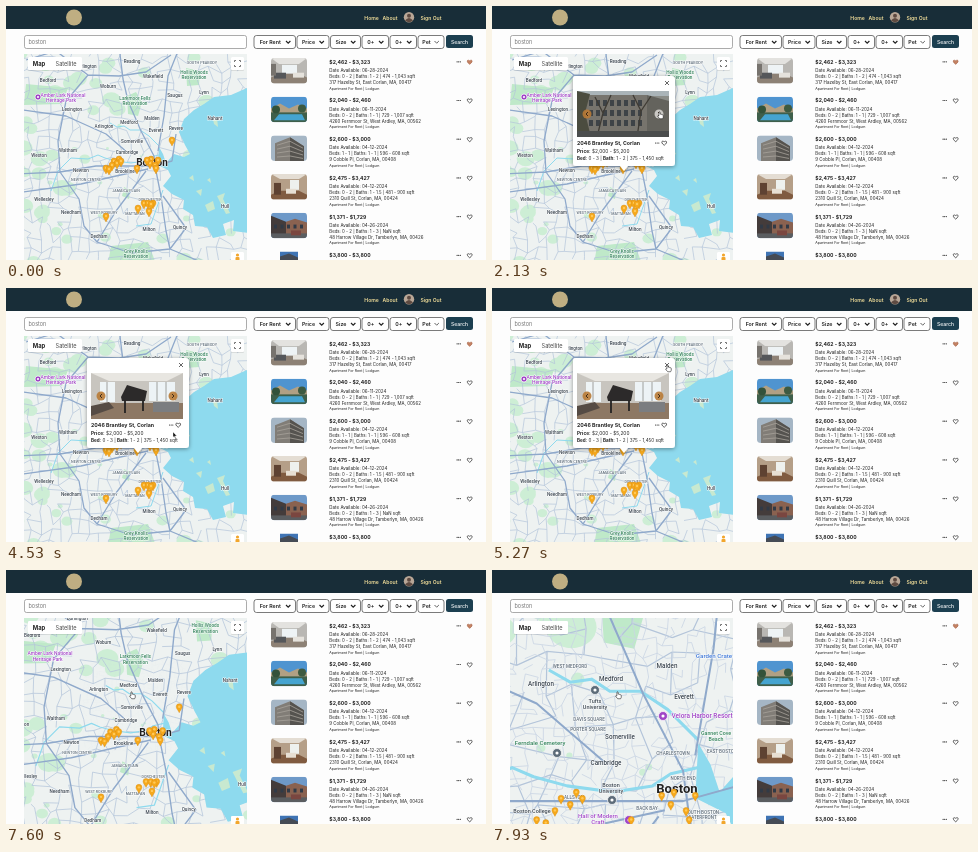
Recreate the animation shown at these times as an HTML page. Size 480x254 px, loop 8 s.

```html
<!DOCTYPE html>
<html lang="en">
<head>
<meta charset="utf-8">
<title>Apartment search</title>
<style>
html, body { margin: 0; height: 100%; overflow: hidden; background: #fff }
svg { display: block }
body > svg { width: 100vw; height: 100vh }
text { font-family: Inter, "Open Sans", sans-serif; fill: #222 }
.b { font-weight: 700 }
.m { text-anchor: middle }
.label { font-family: Roboto, Arial, sans-serif; font-weight: 500; text-anchor: middle; paint-order: stroke; stroke: #fff; stroke-width: 1px; stroke-linejoin: round }
.label.b { font-weight: 700 }
.road { fill: none; vector-effect: non-scaling-stroke; stroke-linejoin: round }
</style>
</head>
<body>
<script>
const LOOP = 8000, STEP = 1000 / 15;
const ZOOM = { x: 127, y: 125.3, start: 7540, rate: 1.115 / 393, max: 3.05 };

let seed = 11;
const rnd = () => (seed = (seed * 16807) % 2147483647) / 2147483647;

const rect = (x, y, w, h, fill, more = '') => `<rect x="${x}" y="${y}" width="${w}" height="${h}" fill="${fill}" ${more}/>`;
const path = (d, fill, more = '') => `<path d="${d}" fill="${fill}" ${more}/>`;
const line = (d, color, width, more = '') => path(d, 'none', `stroke="${color}" stroke-width="${width}" ${more}`);
const circle = (x, y, r, fill, more = '') => `<circle cx="${x}" cy="${y}" r="${r}" fill="${fill}" ${more}/>`;
const text = (x, y, size, str, more = '') => `<text x="${x}" y="${y}" font-size="${size}" ${more}>${str}</text>`;
const group = (x, y, body, more = '') => `<g transform="translate(${x} ${y})" ${more}>${body}</g>`;
const many = (n, f) => Array.from({ length: n }, (_, i) => f(i)).join('');
const heart = (x, y, fill = 'none', color = '#222') =>
  group(x, y, path('M0 2.3C-4-.5-2.3-3 0-1.2C2.3-3 4-.5 0 2.3Z', fill, `stroke="${color}" stroke-width=".7"`));
const dots = (x, y) => many(3, i => circle(x + i * 1.6 - 1.6, y, .6, '#222'));

// ---- Photos, as flat shapes ----
const photos = {
  stone: rect(0, 0, 92, 46, '#8b8d88') + rect(0, 0, 92, 5, '#aab4b8') + rect(8, 4, 62, 38, '#77746d') +
    many(24, i => rect(12 + i % 8 * 7, 9 + (i / 8 | 0) * 10, 4, 6, '#3e4347')) +
    path('M70 4L92 10V42H70Z', '#64635d') + path('M0 0L13 3L8 22L14 46H0Z', '#4b4c3f') +
    line('M20 46L26 22L34 4M26 22L18 6M60 46L64 20L56 4M64 20L74 5', '#3f3b34', 1.3) + rect(0, 40, 92, 6, '#4b4d4d'),
  lounge: rect(0, 0, 92, 46, '#b4aaa0') + path('M0 0H92L70 9H24Z', '#d8d2c8') + rect(24, 9, 46, 20, '#a49b91') +
    rect(44, 9, 24, 18, '#dfe9ee') + line('M52 9V27M60 9V27', '#4e4c49', 1) + path('M0 4L24 9V32L0 41Z', '#564a40') +
    path('M0 46V40L25 29H70L92 40V46Z', '#8a6749') + rect(28, 25, 18, 8, '#5d5d5e') + rect(50, 27, 20, 6, '#d9d4cc') +
    path('M74 8L92 3V38L74 30Z', '#d0c8bd'),
  piano: rect(0, 0, 92, 46, '#c8c5bf') + path('M0 0H92L76 8H18Z', '#e8e6e1') + rect(9, 9, 15, 20, '#eef4f6') +
    rect(58, 9, 26, 19, '#edf3f6') + line('M66 9V28M75 9V28M16 9V29', '#8b8b88', .8) +
    path('M0 46V36L18 30H92V46Z', '#8d7864') + path('M30 24L36 12L56 18L54 28H31Z', '#2c2a2a') +
    line('M34 27V40M52 27V38', '#252323', 1.8) + rect(62, 29, 26, 10, '#7b7d80') + path('M0 33L18 29L23 35L0 43Z', '#554b44'),
  shops: rect(0, 0, 92, 46, '#86b4de') + path('M0 6L30 13L92 18V36H0Z', '#75695c') + path('M0 16L40 20H92V34H0Z', '#b9b3a8') +
    many(7, i => rect(4 + i * 12, 22, 8, 9, '#3d4854')) + path('M0 0H22L30 8L24 15L10 12L0 15Z', '#4d5f3f') +
    circle(70, 11, 7, '#6c7d58') + circle(80, 13, 6, '#55694a') + rect(0, 33, 92, 13, '#a3a5a6') +
    rect(6, 31, 23, 8, '#2d3a4b', 'rx="3"') + rect(35, 32, 19, 7, '#b9bec2', 'rx="3"') + rect(62, 31, 23, 8, '#345a84', 'rx="3"')
};
const thumbs = [
  rect(0, 0, 36, 26, '#b9b7b3') + path('M0 0H36L28 6H8Z', '#e3e2df') + rect(11, 7, 15, 9, '#eef3f5') + path('M0 26V20L8 16H28L36 20V26Z', '#8d8175') + rect(3, 15, 12, 6, '#55575a') + rect(22, 15, 11, 5, '#e5e2dc') + rect(0, 6, 5, 12, '#77736e'),
  rect(0, 0, 36, 26, '#4f94d0') + path('M0 12L9 7L18 12L27 8L36 12V19H0Z', '#b1a084') + rect(0, 16, 36, 10, '#3f5f4a') + path('M8 18H31L34 24H3Z', '#45a4d0') + circle(5, 13, 4, '#33523a') + circle(31, 12, 4, '#3d5a41'),
  rect(0, 0, 36, 26, '#a5b6c5') + path('M4 26V8L19 2L33 11V26Z', '#817d77') + path('M19 2L33 11V26H19Z', '#55534f') + many(4, i => line(`M6 ${10 + i * 4}L19 ${6 + i * 5}L32 ${13 + i * 3.5}`, '#a8a39b', .8)),
  rect(0, 0, 36, 26, '#b59f88') + path('M0 0H36L28 5H9Z', '#e4ddd3') + rect(19, 6, 9, 10, '#eef1ee') + path('M0 26V21L9 17H28L36 21V26Z', '#805b40') + rect(3, 9, 7, 12, '#5e4232') + rect(15, 15, 10, 5, '#e7dfd3'),
  rect(0, 0, 36, 26, '#6e99c8') + path('M0 3L15 9V22H0Z', '#443c3b') + path('M15 9L24 6L36 10V22H15Z', '#8a6250') + many(5, i => rect(3 + i * 6.5, 12, 3, 4, '#313a46')) + rect(0, 21, 36, 5, '#5a5d60') + rect(20, 18, 10, 5, '#7a4640'),
  rect(9, 0, 18, 26, '#3f74b4') + path('M9 5L18 2L27 6V26H9Z', '#454b55')
];

// ---- Map ----
const mesh = (x0, y0, cols, rows, size, keep) => {
  const pts = [];
  for (let j = 0; j <= rows; j++)
    pts.push(Array.from({ length: cols + 1 }, (_, i) => [x0 + (i + rnd() * .8 - .4) * size, y0 + (j + rnd() * .8 - .4) * size].map(v => v.toFixed(1))));
  let d = '';
  for (let j = 0; j < rows; j++) for (let i = 0; i < cols; i++) {
    if (rnd() < keep) d += `M${pts[j][i]}L${pts[j][i + 1]}`;
    if (rnd() < keep) d += `M${pts[j][i]}L${pts[j + 1][i]}`;
  }
  return d;
};
const parks = many(75, () => {
  const x = 10 + rnd() ** 1.4 * 230, y = 35 + rnd() * 230, r = 2 + rnd() * 6;
  return x > 95 && x < 160 && y > 115 && y < 185 ? circle(x, y, r * .3, '#cdeed5')
    : `<ellipse cx="${x}" cy="${y}" rx="${r * 1.2}" ry="${r}" fill="#cdeed5"/>`;
});
const bigParks = path('M121 90L130 86L136 96L132 110L122 108Z M180 62L194 65L193 79L181 80Z M105 240L142 236L150 258H102Z M20 78L62 82L56 98L18 99Z M118 181L124 184L123 193L116 190Z', '#bfe9c9');
const highways = 'M20 54L50 45L82 69L60 95L52 135L54 166L73 193L78 220L91 236L125 247L164 243M82 69L113 70L140 66L165 49M113 40L117 73L122 95L135 125L148 150L150 165L155 190L160 225L164 243L200 258M10 168L54 166L90 160L125 160L148 160L166 155L170 128M152 145L158 110L162 70L172 45M10 103L60 110L100 128L122 147M10 187L75 178L110 170L142 163M91 236L110 205L140 165M164 243L180 222L157 190';
const water = 'M260 76L241 82L225 89L208 91L198 98L188 104L178 113L173 126L179 139L184 148L178 151L168 148L160 157L157 148L153 141L152 159L162 164L165 170L157 180L166 188L178 194L177 203L187 209L189 220L201 221L207 232L220 229L217 218L228 214L227 225L242 227L260 240Z';
const islands = 'M207 113L211 112L212 121L208 118Z M190 185L196 183L195 190Z M199 199L207 195L209 203L202 206Z M211 190L219 187L217 193L224 207L220 208Z M183 172L187 169L188 175Z M201 174L204 172L205 177Z';
const rivers = 'M45 185L52 165L65 152L82 153L92 149L99 152L110 155L125 157L138 155L144 151L153 149M104 117L111 121L118 120L124 124L134 124L143 130L153 140M157 184L145 218L130 220';

const geo = rect(-50, 0, 350, 300, '#eef2f1') + parks + bigParks +
  path(mesh(4, 34, 25, 23, 10, .68), 'none', 'class="road avenue" stroke="#b4c5da" stroke-width=".7"') +
  path(mesh(86, 96, 26, 24, 3.3, .6), 'none', 'id="streets" class="road" stroke="#cad5e4" stroke-width=".8"') +
  path(rivers, 'none', 'class="road" id="river" stroke="#8edaee"') +
  path(water, '#8edaee') + path(islands, '#c8e9d0') +
  path(highways, 'none', 'class="road avenue" stroke="#8fa9cb" stroke-width="1.3"');

// Pin tips in map coordinates
const pins = [[166, 140], [113, 159], [108, 161], [111, 163], [115, 161], [106, 165], [100, 168], [103, 169], [145, 159], [152, 160], [144, 163], [149, 165], [150, 168], [141, 160],
  [131, 168], [138, 203], [142, 203], [147, 203], [145, 204], [143, 211], [132, 208], [100, 216]];
const pin = path('M0 0C-.7-2.4-3-3.6-3-6A3 3 0 0 1 3-6C3-3.6 .7-2.4 0 0Z', '#f6a91b', 'stroke="#d78a12" stroke-width=".4"') + circle(0, -6, 1.2, '#ffc95a');

const TOWN = '#3b4650', AREA = '#5d6c79', PARK = '#2f8058', PURPLE = '#a045c6', BLUE = '#3f78d6';
// [text, x, y, size, colour]
const farLabels = [
  ...'Burlington,80,62;Bedford,42,76;Lexington,66,105;Woburn,102,82;Reading,126,57;Wakefield,147,72;Saugus,169,91;Lynn,198,88;Nahant,209,114;Arlington,98,122;Medford,123,118;Malden,146,114;Everett,150,126;Revere,170,124;Somerville,126,137;Cambridge,121,148;Waltham,62,146;Weston,33,151;Newton,75,166;Brookline,119,167;Wellesley,38,195;Needham,65,208;Dedham,93,232;Milton,143,225;Quincy,174,223;Hull,219,202'
    .split(';').map(s => { const [t, x, y] = s.split(','); return [t, +x, +y, 4.6, TOWN]; }),
  ['SOUTH PEABODY', 196, 58, 3.8, AREA], ['NEWTON CENTRE', 80, 175, 3.7, AREA], ['JAMAICA PLAIN', 120, 186, 3.7, AREA],
  ['DORCHESTER', 144, 195, 3.7, AREA], ['WEST ROXBURY', 98, 208, 3.7, AREA], ['MATTAPAN', 129, 209, 3.7, AREA],
  ['Larkmoor Fells', 129, 94, 4.7, PARK], ['Reservation', 129, 99, 4.7, PARK], ['Hollis Woods', 188, 68, 4.7, PARK], ['Reservation', 188, 73, 4.7, PARK],
  ['Grey Knolls', 130, 247, 4.7, PARK], ['Reservation', 130, 252, 4.7, PARK],
  ['Amber Lark National', 57, 91, 4.9, PURPLE], ['Heritage Park', 55, 96, 4.9, PURPLE]
];
// Positions as seen at full zoom
const nearLabels = [
  ['Arlington', 49, 116, 6.3, TOWN], ['Medford', 119, 111, 6.3, TOWN], ['Malden', 175, 98, 6.3, TOWN], ['Everett', 192, 129, 6.3, TOWN],
  ['Somerville', 128, 169, 6.3, TOWN], ['Cambridge', 114, 195, 6.3, TOWN], ['WEST MEDFORD', 78, 98, 4.6, AREA],
  ['DAVIS SQUARE', 97, 151, 4.6, AREA], ['PORTER SQUARE', 96, 161, 4.6, AREA], ['CHARLESTOWN', 181, 185, 4.6, AREA], ['EAST BOSTON', 230, 183, 4.6, AREA],
  ['NORTH END', 191, 210, 4.6, AREA], ['BACK BAY', 155, 240, 4.6, AREA], ['ALLSTON', 82, 229, 4.6, AREA], ['SOUTH BOSTON', 210, 244, 4.6, AREA], ['WATERFRONT', 210, 249, 4.6, AREA],
  ['Tufts', 103, 133, 5.5, TOWN], ['University', 103, 139, 5.5, TOWN], ['Boston', 119, 217, 5.5, TOWN], ['University', 119, 223, 5.5, TOWN], ['Boston College', 40, 243, 5.5, TOWN],
  ['Velora Harbor Resort', 210, 148, 6.5, PURPLE], ['Garden Crate', 222, 88, 6.2, BLUE], ['Gannet Cove', 224, 165, 5.3, PARK], ['Beach', 224, 171, 5.3, PARK],
  ['Ferndale Cemetery', 48, 175, 6, PARK], ['Hall of Modern', 106, 248, 6, PURPLE], ['Craft', 106, 254, 6, PURPLE]
];
const unzoom = (x, y) => [ZOOM.x + (x - ZOOM.x) / ZOOM.max, ZOOM.y + (y - ZOOM.y) / ZOOM.max];
const badge = (r, color) => circle(0, 0, r, color, 'stroke="#fff" stroke-width=".7"') + circle(0, 0, r * .35, '#fff');
const items = [
  ...farLabels.map(([t, x, y, s, c]) => ({ x, y, kind: 'far', html: text(0, 0, s, t, `class="label" style="fill:${c}"`) })),
  { x: 32, y: 91, kind: 'far', html: badge(3, PURPLE) },
  ...nearLabels.map(([t, x, y, s, c]) => { const [mx, my] = unzoom(x, y); return { x: mx, y: my, kind: 'near', html: text(0, 0, s, t, `class="label" style="fill:${c}"`) }; }),
  ...[[103, 120, AREA], [120, 230, AREA], [65, 183, AREA], [171, 146, PURPLE], [137, 250, PURPLE]].map(([x, y, c]) => {
    const [mx, my] = unzoom(x, y); return { x: mx, y: my, kind: 'near', html: badge(4.5, c) };
  }),
  { x: 146, y: 156, kind: 'both', html: text(0, 4, 10, 'Boston', 'id="city" class="label b"') },
  ...pins.map(([x, y]) => ({ x, y, kind: 'both', html: pin }))
];

// ---- Popups ----
const arrowButton = (x, dir) => circle(x, 38, 4.5, '#b87a35', 'class="arrow" fill-opacity=".9"') +
  line(`M${x - dir} 36L${x + dir} 38L${x - dir} 40`, '#332313', .9);
const popup = (id, x, y, title, price, beds, names) => group(x, y,
  path('M3 0H99Q102 0 102 3V87Q102 90 99 90H55L51 95L47 90H3Q0 90 0 87V3Q0 0 3 0Z', '#fff', 'filter="url(#shadow)"') +
  line('M92 5L96 9M96 5L92 9', '#555', .9) +
  `<svg x="4" y="15" width="92" height="46" viewBox="0 0 92 46">${names.map(n => `<g id="${n}">${photos[n]}</g>`).join('')}</svg>` +
  arrowButton(14, -1) + arrowButton(86, 1) +
  text(4, 69, 5.25, title, 'class="b"') + dots(84.2, 67) + heart(91.2, 67) +
  text(4, 76.6, 4.8, `<tspan class="b">Price:</tspan> ${price}`) +
  text(4, 84.2, 4.6, `<tspan class="b">Bed:</tspan> ${beds[0]} | <tspan class="b">Bath:</tspan> ${beds[1]} | ${beds[2]} sqft`), `id="${id}"`);

const map = `<svg x="18" y="48" width="223" height="206" viewBox="18 48 223 206">
  <g id="geo">${geo}</g>${items.map(i => `<g class="item">${i.html}</g>`).join('')}` +
  rect(22, 51, 54, 13, '#fff', 'rx="1" filter="url(#soft)"') + text(33, 59.6, 5.8, 'Map', 'class="b m"') + text(60, 59.6, 5.6, 'Satellite', 'class="m" style="fill:#444"') +
  rect(225, 51, 13, 13, '#fff', 'rx="1" filter="url(#soft)"') +
  line('M228.5 56V54.5H230M233 54.5H234.5V56M234.5 59V60.5H233M230 60.5H228.5V59', '#666', .9) +
  rect(225, 246, 13, 13, '#fff', 'rx="1" filter="url(#soft)"') + circle(231.5, 249, 1.6, '#f2a62c') + rect(229.5, 251, 4, 5, '#f2a62c', 'rx="1"') +
  popup('first', 81, 70, '2046 Brantley St, Corlan', '$2,000 - $5,200', ['0 - 3', '1 - 2', '375 - 1,450'], ['stone', 'lounge', 'piano']) +
  popup('second', 96, 110, '618-624 Quill St, Tamberlyn', '$2,210 - $2,660', ['0 - 2', '1 - 1', '450 - 790'], ['shops']) + '</svg>';

// ---- Page ----
const filters = [['For Rent', 248, 41.5], ['Price', 291, 32], ['Size', 324.5, 30], ['0+', 356, 26.5], ['0+', 384, 26.5], ['Pet', 412, 26]];
const filterButton = ([name, x, w]) => rect(x, 29.5, w, 13, '#fff', 'rx="2.5" stroke="#444" stroke-width=".7"') +
  text(x + (w - 9) / 2, 38, 5.3, name, 'class="m" font-weight="600"') + line(`M${x + w - 9.5} 35L${x + w - 7.3} 37.2L${x + w - 5.1} 35`, '#222', name === 'Pet' ? .7 : 1.2);

const rows = [
  ['$2,462 - $3,323', '06-28', '0 - 2', '1 - 2', '474 - 1,043', '317 Hazelby St, East Corlan, MA, 00417'],
  ['$2,040 - $2,460', '06-11', '0 - 2', '1 - 1', '729 - 1,007', '4260 Fernmoor St, West Ardley, MA, 00562'],
  ['$2,600 - $3,000', '04-12', '1 - 1', '1 - 1', '596 - 608', '9 Cobble Pl, Corlan, MA, 00408'],
  ['$2,475 - $3,427', '04-12', '0 - 2', '1 - 1.5', '481 - 900', '2310 Quill St, Corlan, MA, 00424'],
  ['$1,371 - $1,729', '04-26', '0 - 2', '1 - 3', 'NaN', '48 Harrow Village Dr, Tamberlyn, MA, 00426'],
  ['$3,800 - $3,800', '04-26', '2 - 2', '1 - 1', '900 - 900', '12 Cobble Pl, Corlan, MA, 00408']
];
const row = ([price, date, beds, baths, area, address], i) => group(0, 52 + i * 38.7,
  `<svg x="265" width="36" height="25.5" viewBox="0 0 36 26" preserveAspectRatio="none"><g clip-path="url(#round)">${thumbs[i]}</g></svg>` +
  text(323.3, 5.8, 5.1, price, 'class="b"') + text(323.3, 14, 4.5, `Date Available: ${date}-2024`) +
  text(323.3, 20, 4.35, `Beds: ${beds} | Baths: ${baths} | ${area} sqft`) + text(323.3, 26.1, 4.45, address) +
  text(323.3, 31.6, 3.6, 'Apartment For Rent | Lodgum') + dots(452.7, 3.8) +
  (i ? heart(463.7, 4) : heart(463.7, 4, '#c58363', '#a9684e')));

const nav = 'class="m" font-weight="600" style="fill:#f3df9a"';
document.body.innerHTML = `<svg viewBox="0 0 480 254" preserveAspectRatio="none"><defs>
  <filter id="shadow" x="-15%" y="-15%" width="130%" height="135%"><feDropShadow dx="0" dy="1" stdDeviation="2" flood-opacity=".4"/></filter>
  <filter id="soft" x="-20%" y="-30%" width="140%" height="170%"><feDropShadow dx="0" dy=".3" stdDeviation=".6" flood-opacity=".3"/></filter>
  <clipPath id="round"><rect width="36" height="26" rx="3.5"/></clipPath></defs>` +
  rect(0, 0, 480, 254, '#fdfdfd') + rect(0, 0, 480, 23, '#182d38') + circle(68, 11.5, 8, '#bfae82') +
  text(365.6, 13.5, 5.1, 'Home', nav) + text(384, 13.5, 5.1, 'About', nav) + text(425, 13.5, 5.1, 'Sign Out', nav) +
  circle(403, 11.3, 5.2, '#b9a797') + circle(403, 9.7, 2, '#5e4a41') + path('M399 14.6Q403 9.5 407 14.6Q403 18 399 14.6Z', '#5e4a41') +
  rect(18.5, 29.5, 222, 13, '#fff', 'rx="2" stroke="#888" stroke-width=".7"') + text(22.5, 38, 5.5, 'boston', 'style="fill:#777"') +
  filters.map(filterButton).join('') + rect(440, 29, 27, 13, '#1c3f50', 'rx="2.5"') + text(453.5, 37.6, 5.1, 'Search', 'class="m" font-weight="500" style="fill:#fff"') +
  rows.map(row).join('') + map +
  `<g id="cursor"><g id="hand" transform="scale(.75)">${path('M0 0Q1-.7 1.5.3V3Q2.5 2.3 3 3.2Q4 2.7 4.4 3.7Q5.7 3.4 5.7 4.8V7L4.8 9H1L-1.8 5.8Q-1.9 4.6-.3 5.3Z', '#fff', 'stroke="#222" stroke-width=".8"')}</g>
  <g id="arrow" transform="scale(.75)">${path('M0 0V7L1.6 5.6L2.7 8L3.8 7.5L2.7 5.2H5Z', '#111', 'stroke="#fff" stroke-width=".5"')}</g></g></svg>`;

// ---- Motion ----
const $ = id => document.getElementById(id);
const nodes = [...document.querySelectorAll('.item')];
const hover = document.querySelectorAll('#first .arrow')[1];
const [avenues, freeways] = document.querySelectorAll('.avenue');
const show = (node, on) => { node.style.display = on ? '' : 'none'; };
const between = (t, a, b) => t >= a && t < b;

// [time, x, y]
const track = [[0, 302, 262], [850, 131, 162], [1100, 131, 162], [1700, 167, 106], [3950, 167, 106], [4400, 167, 144], [4700, 167, 144], [5150, 175, 77],
  [5330, 175, 77], [5800, 163, 192], [5960, 158, 184], [6080, 150, 174], [6300, 147, 184], [6530, 147, 184], [6900, 189, 117], [7080, 178, 119], [7200, 125, 122], [8000, 125, 122]];
function cursorAt(t) {
  const i = track.findIndex((k, n) => n && t <= k[0]);
  const [t0, x0, y0] = track[i - 1], [t1, x1, y1] = track[i];
  const u = (t - t0) / (t1 - t0), e = u * u * (3 - 2 * u);
  return [x0 + (x1 - x0) * e, y0 + (y1 - y0) * e];
}

function draw(t) {
  const s = Math.min(ZOOM.max, Math.exp(Math.max(0, t - ZOOM.start) * ZOOM.rate));
  const ox = ZOOM.x * (1 - s), oy = ZOOM.y * (1 - s);
  const near = s > 1.7;
  $('geo').setAttribute('transform', `translate(${ox} ${oy}) scale(${s})`);
  $('streets').style.opacity = Math.min(1, Math.max(0, s - 1.1));
  $('river').setAttribute('stroke-width', s);
  avenues.setAttribute('stroke-width', .7 * s ** .5);
  freeways.setAttribute('stroke-width', 1.3 * s ** .4);
  $('city').setAttribute('font-size', 10 + (s - 1) * 1.5);
  items.forEach(({ x, y, kind }, i) => {
    nodes[i].setAttribute('transform', `translate(${ox + x * s} ${oy + y * s})`);
    show(nodes[i], kind === 'both' || (kind === 'near') === near);
  });
  show($('first'), between(t, 1000, 5330));
  show($('second'), between(t, 6320, 7000));
  show($('stone'), t < 2530);
  show($('lounge'), between(t, 2530, 3860));
  show($('piano'), t >= 3860);
  hover.setAttribute('fill', between(t, 1600, 4050) ? '#d5d3cf' : '#b87a35');
  const [cx, cy] = cursorAt(t);
  $('cursor').setAttribute('transform', `translate(${cx} ${cy})`);
  const arrow = between(t, 4050, 5000) || between(t, 6320, 6750);
  show($('arrow'), arrow);
  show($('hand'), !arrow);
}

const begin = performance.now();
function tick() {
  const t = (performance.now() - begin) % LOOP;
  draw(Math.floor((t + 4) / STEP) * STEP % LOOP);
  requestAnimationFrame(tick);
}
tick();
</script>
</body>
</html>
```
